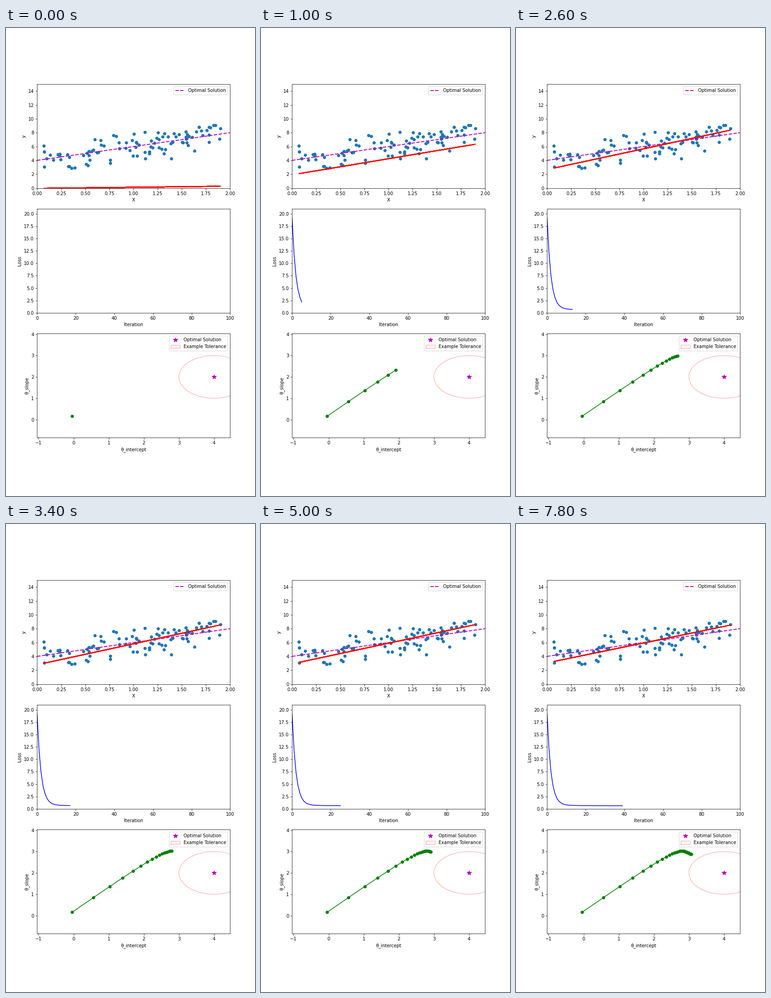
Write a matplotlib script that moves like this. It is 547 by 1025 pixels and loops after 8000 ms.

```python
import numpy as np
import matplotlib.pyplot as plt
from matplotlib.animation import FuncAnimation
from matplotlib.patches import Circle

WIDTH, HEIGHT, DPI = 547, 1025, 72
FRAMES, INTERVAL = 40, 200
RATE = 0.1
TRUE_THETA = np.array([4.0, 2.0])
START_THETA = np.array([-0.04, 0.16])

plt.rcParams.update({"font.family": "DejaVu Sans", "font.size": 10})

# Noisy samples around the true line
np.random.seed(20)
x = 2 * np.random.rand(100)
y = TRUE_THETA[0] + TRUE_THETA[1] * x + np.random.randn(100)
design = np.column_stack([np.ones_like(x), x])


def descend(theta, steps):
    """Return the parameters and half mean squared error of each step."""
    path, losses = [], []
    for _ in range(steps):
        error = design @ theta - y
        path.append(theta)
        losses.append(np.mean(error ** 2) / 2)
        theta = theta - RATE * design.T @ error / len(y)
    return np.array(path), np.array(losses)


def setup(ax, xlabel, ylabel, xlim, ylim):
    ax.set(xlabel=xlabel, ylabel=ylabel, xlim=xlim, ylim=ylim)


path, losses = descend(START_THETA, FRAMES)

fig, (fit_ax, loss_ax, theta_ax) = plt.subplots(
    3, 1, figsize=(WIDTH / DPI, HEIGHT / DPI), dpi=DPI)
fig.subplots_adjust(left=0.125, right=0.9, bottom=0.125, top=0.88, hspace=0.2)

# Data and current fit
fit_ax.scatter(x, y)
fit_ax.plot([0, 2], [4, 8], "m--", lw=2, label="Optimal Solution")
fit_line, = fit_ax.plot([], [], "r-", lw=2)
setup(fit_ax, "X", "y", (0, 2), (0, 15))
fit_ax.legend(loc="upper right")

# Loss history
loss_line, = loss_ax.plot([], [], "b-")
setup(loss_ax, "Iteration", "Loss", (0, 100), (0, 21))

# Path through parameter space
theta_ax.plot(*TRUE_THETA, "m*", ms=10, label="Optimal Solution")
theta_ax.add_patch(Circle(TRUE_THETA, 1, color="r", fill=False, ls=":",
                          label="Example Tolerance"))
theta_line, = theta_ax.plot([], [], "go-")
setup(theta_ax, "θ_intercept", "θ_slope", (-1.04, 4.457), (-0.84, 4.03))
theta_ax.legend(loc="upper right")


def update(i):
    fit_line.set_data(x, design @ path[i])
    loss_line.set_data(np.arange(i + 1), losses[:i + 1])
    theta_line.set_data(path[:i + 1, 0], path[:i + 1, 1])
    return fit_line, loss_line, theta_line


anim = FuncAnimation(fig, update, frames=FRAMES, interval=INTERVAL,
                     init_func=lambda: update(0), repeat=True, repeat_delay=0)
plt.show()
```
